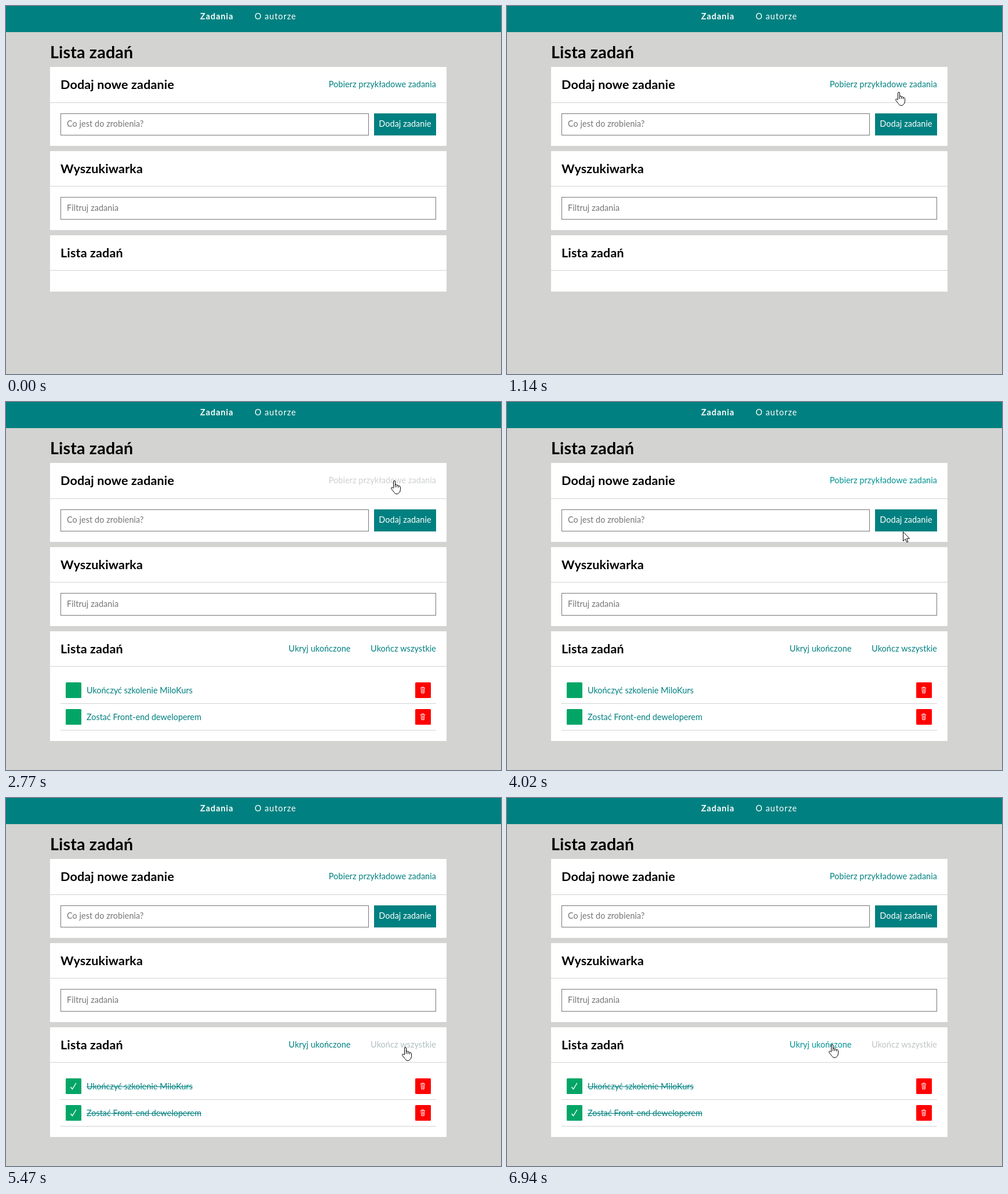
These frames come from a looping animation (854x634 px, 8000 ms). An HTML page with a canvas:

```html
<!DOCTYPE html>
<html lang="pl">
<head>
<meta charset="utf-8">
<title>Lista zadań</title>
<style>
html, body { margin: 0; width: 100%; height: 100%; overflow: hidden; background: #d3d3d1; }
canvas { display: block; }
</style>
</head>
<body>
<canvas id="stage" width="854" height="634"></canvas>
<script>
const ctx = document.getElementById('stage').getContext('2d');
const LOOP = 8000;
const TEAL = [0, 128, 128], HOVER = [0, 146, 146], MUTED = [206, 208, 208], DONE = [192, 195, 195];
const PAGE = '#d3d3d1', LINE = '#d3d3d3', GREEN = '#03a567';

const ARROW = new Path2D('M.5 .7V16.5L4.2 13L6.7 18.6L9 17.6L6.6 12.2H11.5Z');
const HAND = new Path2D('M4.5 13V2Q4.5 .5 6 .5Q7.5 .5 7.5 2V8Q7.8 6.8 9 7Q10.4 7.2 10.5 8.8Q11 7.8 12.2 8.2Q13.4 8.6 13.5 10Q14 9.2 15.2 9.7Q16.5 10.2 16.5 11.5V15.5Q16.5 19.5 14.2 21.5Q12.5 23.5 10 23.5Q7 23.5 5.5 20.5L1 14.8Q0 12.5 1.5 12.1Q3 11.8 4.5 14');
const KNUCKLES = new Path2D('M7.5 8V12M10.5 8.8V12M13.5 10V12.5');

// time, x, y, pointer shape from that time on
const cursorKeys = [
  [320, 770, 559, ARROW], [500, 745, 500, ARROW], [740, 695, 340, ARROW], [870, 662, 240, ARROW],
  [930, 656, 210, HAND], [1010, 664, 180, ARROW], [1080, 677, 159, ARROW],
  [1140, 675, 148, HAND], [1400, 670, 136, HAND], [1610, 669, 135, HAND], [4019, 669, 135, HAND],
  [4020, 683, 222, ARROW], [4080, 695, 305, ARROW], [4150, 706, 385, ARROW], [4290, 703, 402, ARROW],
  [4360, 699, 420, HAND], [4700, 690, 428, HAND], [5080, 688, 429, HAND], [5530, 688, 429, HAND],
  [5640, 628, 436, ARROW], [5700, 602, 430, ARROW], [5770, 585, 427, HAND], [5950, 560, 424, HAND]
];

const clamp = v => Math.max(0, Math.min(1, v));
const mix = (a, b, p) => a.map((v, i) => v + (b[i] - v) * p);
const rgb = c => `rgb(${c.map(Math.round)})`;

// Runs through colour changes of the form [start, target, duration].
function fade(t, from, changes) {
  return rgb(changes.reduce((c, [start, to, ms = 320]) => mix(c, to, clamp((t - start) / ms)), from));
}

function rect(x, y, w, h, color) {
  ctx.fillStyle = color;
  ctx.fillRect(x, y, w, h);
}

function tile(x, y, color) {
  ctx.fillStyle = color;
  ctx.beginPath();
  ctx.roundRect(x, y, 27, 27, 1.5);
  ctx.fill();
}

function text(str, x, y, color, { size = 14.4, weight = 400, align = 'left', spacing = 0.08 } = {}) {
  ctx.font = `${weight} ${size}px Lato, sans-serif`;
  ctx.letterSpacing = spacing + 'px';
  ctx.textAlign = align;
  ctx.fillStyle = color;
  ctx.fillText(str, x, y);
  return ctx.measureText(str).width;
}

const link = (str, right, y, color) => text(str, right, y, color, { align: 'right' });

function card(title, y, height) {
  rect(76, y, 684, height, '#fff');
  rect(76, y + (y === 105 ? 61 : 60), 684, 1, LINE);
  text(title, 94, y + 38, '#000', { size: 21.6, weight: 700, spacing: 0.1 });
}

function input(placeholder, y, w, h) {
  ctx.strokeStyle = '#767676';
  ctx.lineWidth = 1;
  ctx.strokeRect(94.5, y + 0.5, w - 1, h - 1);
  text(placeholder, 105, y + (h === 38 ? 23 : 24), '#757575');
}

function tick(x, y) {
  ctx.strokeStyle = '#fff';
  ctx.lineWidth = 1.4;
  ctx.beginPath();
  ctx.moveTo(x + 8.5, y + 15);
  ctx.lineTo(x + 11.5, y + 18.5);
  ctx.lineTo(x + 18, y + 8);
  ctx.stroke();
}

function bin(x, y) {
  ctx.strokeStyle = 'rgba(255,255,255,.85)';
  ctx.lineWidth = 1;
  ctx.stroke(new Path2D(`M${x + 9} ${y + 9.5}h8M${x + 11.5} ${y + 9}v-1h3v1M${x + 10} ${y + 10}l.7 8.5h4.6l.7 -8.5M${x + 12.2} ${y + 11}v6.5M${x + 14} ${y + 11}v6.5`));
}

function task(label, y, done) {
  tile(103, y, GREEN);
  tile(706, y, '#f00');
  bin(706, y);
  const width = text(label, 139, y + 19, rgb(TEAL), { spacing: 0 });
  if (done) {
    tick(103, y);
    rect(139, y + 14, width, 1, rgb(TEAL));
  }
  rect(94, y + 36, 648, 1, LINE);
}

function cursor(t) {
  if (t < cursorKeys[0][0]) return;
  const i = cursorKeys.findLastIndex(k => k[0] <= t);
  const a = cursorKeys[i], b = cursorKeys[i + 1] || a;
  const p = a === b ? 0 : (t - a[0]) / (b[0] - a[0]);
  const [x, y] = mix([a[1], a[2]], [b[1], b[2]], p).map(Math.round);
  const shape = a[3];
  ctx.save();
  ctx.translate(shape === HAND ? x - 5 : x, y);
  ctx.lineWidth = 1;
  ctx.lineJoin = 'round';
  ctx.fillStyle = '#fff';
  ctx.strokeStyle = '#000';
  ctx.fill(shape);
  ctx.stroke(shape);
  if (shape === HAND) ctx.stroke(KNUCKLES);
  ctx.restore();
}

function draw(t) {
  const loaded = t >= 2770;
  const done = t >= 5150;
  const hidden = t >= 6010 && t < 6810;
  const listed = loaded && !hidden;

  rect(0, 0, 854, 634, PAGE);
  rect(0, 0, 854, 45, rgb(TEAL));
  text('Zadania', 335, 23, '#fff', { weight: 700, spacing: 1 });
  text('O autorze', 429, 23, '#fff', { spacing: 1 });
  text('Lista zadań', 76, 90, '#000', { size: 28.8, weight: 700, spacing: 0.1 });

  card('Dodaj nowe zadanie', 105, 136);
  link('Pobierz przykładowe zadania', 742, 140,
    fade(t, TEAL, [[1140, HOVER], [1750, MUTED], [2770, HOVER], [4220, TEAL]]));
  input('Co jest do zrobienia?', 185, 532, 38);
  rect(635, 185, 107, 38, fade(t, TEAL, [[890, HOVER, 60], [1010, TEAL, 70]]));
  text('Dodaj zadanie', 688.5, 208, '#fff', { align: 'center' });

  card('Wyszukiwarka', 250, 136);
  input('Filtruj zadania', 329, 648, 39);

  if (hidden) rect(76, 492, 684, 92, '#ced2d3');
  card('Lista zadań', 395, listed ? 189 : 97);
  if (loaded) {
    link(hidden ? 'Pokaż ukończone' : 'Ukryj ukończone', 594.5, 430, fade(t, TEAL, [[5740, HOVER, 210]]));
    link('Ukończ wszystkie', 742, 430, fade(t, TEAL, [[4360, HOVER], [5150, DONE, 350]]));
  }
  if (listed) {
    task('Ukończyć szkolenie MiloKurs', 483, done);
    task('Zostać Front-end deweloperem', 529, done);
  }
  cursor(t);
}

function frame() {
  draw(performance.now() % LOOP);
  requestAnimationFrame(frame);
}
frame();
</script>
</body>
</html>
```
